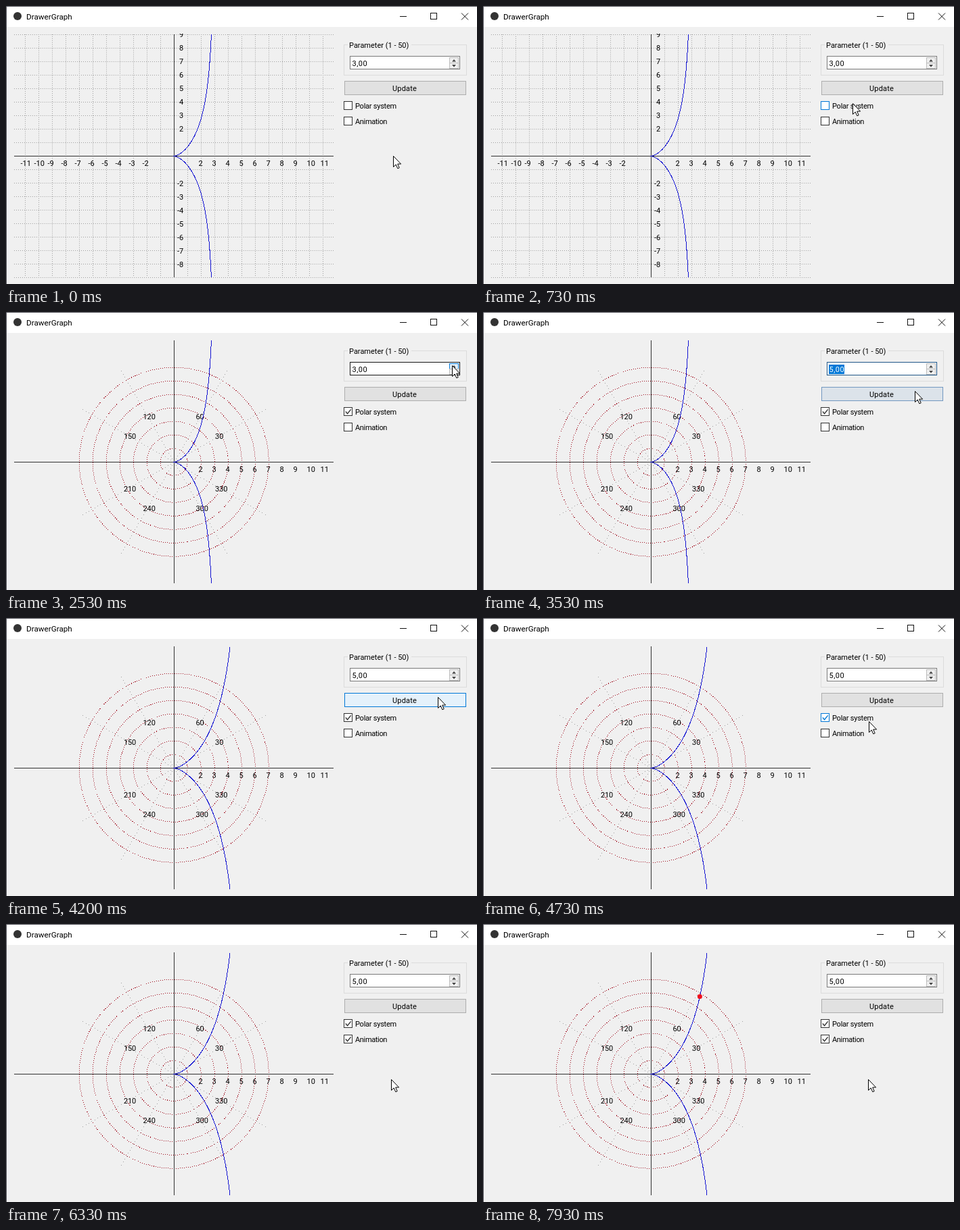
Recreate the animation shown at these times as an HTML page. Size 696 px wide and 412 px high, loop 8 s.

```html
<!DOCTYPE html>
<html lang="en">
<head>
<meta charset="utf-8">
<title>DrawerGraph</title>
<style>
html, body { margin: 0; width: 100%; height: 100%; overflow: hidden; background: #f0f0f0; }
svg { display: block; width: 696px; height: 412px; }
text { font: 11px Roboto, "Open Sans", sans-serif; fill: #000; white-space: pre; }
.title { font-size: 11.7px; }
.crisp { shape-rendering: crispEdges; }
.line { fill: none; stroke: #333; }
</style>
</head>
<body>
<svg id="stage" viewBox="0 0 696 412" xmlns="http://www.w3.org/2000/svg"></svg>
<script>
const NS = 'http://www.w3.org/2000/svg';
const stage = document.getElementById('stage');
const CX = 248.5, CY = 222.5, UNIT = 20;
const FRAME = 1000 / 15, LOOP = 8000;

function add(parent, tag, attrs = {}, content) {
  const el = document.createElementNS(NS, tag);
  set(el, attrs);
  if (content !== undefined) el.textContent = content;
  return parent.appendChild(el);
}
function set(el, attrs) {
  for (const k in attrs) el.setAttribute(k, attrs[k]);
}
function rect(parent, x, y, width, height, fill, stroke = 'none') {
  return add(parent, 'rect', { x, y, width, height, fill, stroke, class: 'crisp' });
}
function path(parent, d, attrs = {}) {
  return add(parent, 'path', { d, fill: 'none', ...attrs });
}
function label(parent, x, y, s, spacing = 0, attrs = {}) {
  return add(parent, 'text', { x, y, 'letter-spacing': spacing, ...attrs }, s);
}
function show(el, on) { el.style.display = on ? '' : 'none'; }

// Window frame
rect(stage, 0, 0, 696, 412, '#f0f0f0');
rect(stage, 0, 0, 696, 31, '#fff');
rect(stage, 0, 0, 696, 1, '#4c4c54');
rect(stage, 0, 0, 1, 412, '#4c4c54');
add(stage, 'circle', { cx: 17, cy: 15, r: 6, fill: '#333' });
label(stage, 30, 20, 'DrawerGraph', 0, { class: 'title' });
path(stage, 'M582 15.5h10M627.5 10.5h9v9h-9z', { stroke: '#111', class: 'crisp' });
path(stage, 'M673 10.5l10 10M683 10.5l-10 10', { stroke: '#111' });

// Graph area
const clip = add(add(stage, 'defs'), 'clipPath', { id: 'area' });
add(clip, 'rect', { x: 12, y: 41, width: 473, height: 362 });
const graph = add(stage, 'g', { 'clip-path': 'url(#area)' });
const grid = add(graph, 'g');
const polar = add(graph, 'g');

let d = '';
for (let i = -11; i <= 11; i++) d += `M${CX + i * UNIT} 42V402`;
for (let i = -9; i <= 9; i++) d += `M12 ${CY + i * UNIT}H484`;
path(grid, d, { stroke: '#a0a0a0', 'stroke-dasharray': '1 2', class: 'crisp' });

for (let i = 1; i <= 7; i++) {
  add(polar, 'circle', { cx: CX - .3, cy: CY - .3, r: i * UNIT, fill: 'none',
    stroke: '#a01020', 'stroke-dasharray': '1 2', class: 'crisp' });
}
for (let a = 30; a < 360; a += 30) {
  if (a % 90 === 0) continue;
  const c = Math.cos(a * Math.PI / 180), s = Math.sin(a * Math.PI / 180);
  path(polar, `M${CX} ${CY}L${CX + 157 * c} ${CY - 157 * s}`,
    { stroke: '#a0a0a0', 'stroke-dasharray': '1 4', class: 'crisp' });
  label(polar, CX - 7 + 78 * c, CY + 4.5 - 78 * s, a, -.1);
}

path(graph, `M${CX} 42V402M12 ${CY}H484`, { class: 'line crisp' });
for (let i = 2; i <= 11; i++) {
  label(graph, CX - 4 + i * UNIT, 237, i);
  label(grid, CX - 7 - i * UNIT, 237, -i);
  if (i <= 9) label(grid, 256, 226 - i * UNIT, i);
  if (i <= 8) label(grid, 253, 227 + i * UNIT, -i);
}

// Cissoid y^2 = x^3 / (a - x), with x solved by bisection for a given y
function cissoidX(a, y) {
  let lo = 0, hi = a;
  for (let i = 0; i < 30; i++) {
    const x = (lo + hi) / 2;
    if (x * x * x < y * y * (a - x)) lo = x; else hi = x;
  }
  return lo;
}
function cissoid(a) {
  let s = '';
  for (let py = -180; py <= 180; py += 2) {
    s += `${s ? 'L' : 'M'}${CX + UNIT * cissoidX(a, py / UNIT)} ${CY + py}`;
  }
  return s;
}
const curves = { 3: cissoid(3), 5: cissoid(5) };
const curve = path(graph, '', { stroke: '#1414d2', class: 'crisp' });
const dot = add(graph, 'circle', { r: 3.5, fill: '#f0101c' });

// Side panel
path(stage, 'M505 57.5H499.5V102.5H680.5V57.5H599', { stroke: '#dcdcdc', class: 'crisp' });
label(stage, 507, 62, 'Parameter (1 - 50)');
const spin = rect(stage, 508.5, 74.5, 162, 19, '#fff', '#7a7a7a');
const picked = rect(stage, 511, 78, 23, 14, '#0078d7');
const value = label(stage, 511.5, 89, '3,00', .5);
const up = rect(stage, 655.5, 76.5, 13, 8, '#f0f0f0', '#bcbcbc');
rect(stage, 655.5, 84.5, 13, 8, '#f0f0f0', '#bcbcbc');
path(stage, 'M659 82.5h6l-3-3.5zM659 87h6l-3 3.5z', { fill: '#444' });

const button = rect(stage, 500.5, 111.5, 179, 20, '#e1e1e1', '#adadad');
label(stage, 589, 126, 'Update', .2, { 'text-anchor': 'middle' });

function checkbox(y, s, spacing) {
  const box = rect(stage, 499.5, y, 12, 12, '#fff', '#333');
  const mark = path(stage, `M501.8 ${y + 6}l2.8 3.1 5-6.2`, { 'stroke-width': 1.4 });
  label(stage, 516, y + 10.5, s, spacing);
  return (on, hover, pressed) => {
    const ink = pressed ? '#005499' : hover ? '#0078d7' : '#333';
    set(box, { stroke: ink, fill: pressed ? '#cce4f7' : '#fff' });
    set(mark, { stroke: ink });
    show(mark, on);
  };
}
const polarBox = checkbox(141.5, 'Polar system', -.25);
const animBox = checkbox(164.5, 'Animation', -.35);

const cursor = path(stage, 'M-.5 -.5V15.5L3.2 12 5.8 17.8 8.2 16.8 5.7 11.1H10.6Z',
  { fill: '#fff', stroke: '#000' });

// Pointer stops: step, x, y
const stops = [
  [0, 573, 223], [11, 547, 145], [25, 547, 145], [37, 660, 80], [46, 660, 80],
  [51, 639, 118], [63, 639, 118], [76, 537, 171], [86, 537, 171], [95, 570, 231]
];
function pointer(n) {
  const i = stops.findIndex(s => s[0] > n);
  if (i < 0) return stops[stops.length - 1].slice(1);
  const [n0, x0, y0] = stops[i - 1], [n1, x1, y1] = stops[i];
  const u = (n - n0) / (n1 - n0), e = u * u * (3 - 2 * u);
  return [x0 + (x1 - x0) * e, y0 + (y1 - y0) * e].map(Math.round);
}

function buttonLook(n, hover) {
  if (n >= 54 && n < 57) return { fill: '#cce4f7', stroke: '#005499' };
  if (!hover) return { fill: '#e1e1e1', stroke: '#adadad' };
  if (n < 54) return { fill: '#dce3ea', stroke: '#7298c0' };
  return { fill: '#e5f1fb', stroke: '#0078d7' };
}

function draw(t) {
  const n = Math.floor((t + 4) / FRAME);
  const [x, y] = pointer(n);
  const over = (l, t, r, b) => x >= l && x <= r && y >= t && y <= b;

  const isPolar = n >= 18;
  show(grid, !isPolar);
  show(polar, isPolar);
  set(curve, { d: curves[n >= 57 ? 5 : 3] });

  const focus = n >= 39 && n < 54;
  value.textContent = n >= 43 ? '5,00' : n >= 39 ? '4,00' : '3,00';
  value.style.fill = focus ? '#fff' : '#000';
  show(picked, focus);
  set(spin, { stroke: focus ? '#1f5688' : over(508, 74, 671, 94) ? '#171717' : '#7a7a7a' });
  const onUp = over(655, 76, 669, 84);
  set(up, { fill: onUp ? '#e5f1fb' : '#f0f0f0', stroke: onUp ? '#0078d7' : '#bcbcbc' });

  set(button, buttonLook(n, over(500, 111, 680, 132)));
  polarBox(isPolar, over(499, 139, 580, 157), n === 17);
  animBox(n >= 79, over(499, 162, 566, 180), n === 78);

  show(dot, n >= 106);
  const py = 180 - (n - 106) * 5;
  set(dot, { cx: CX + UNIT * cissoidX(5, py / UNIT), cy: CY - py });
  set(cursor, { transform: `translate(${x} ${y})` });
}

const start = performance.now();
function tick() {
  draw((performance.now() - start) % LOOP);
  requestAnimationFrame(tick);
}
tick();
</script>
</body>
</html>
```
